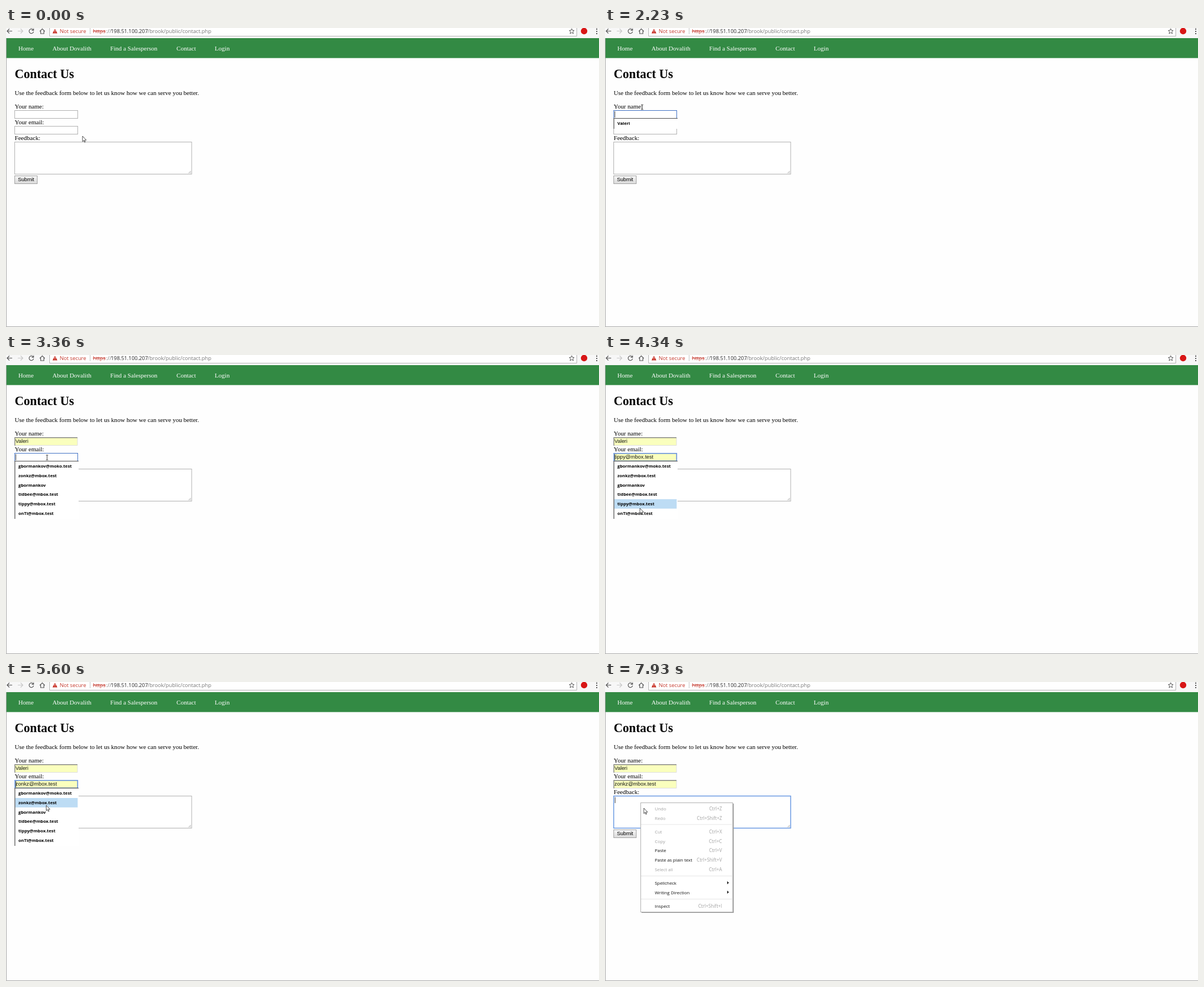
Animation of 1054 by 531 pixels, one loop 8 s. Source, as an HTML page:

```html
<!DOCTYPE html>
<html lang="en">
<head>
<meta charset="utf-8">
<title>Contact form</title>
<style>
  html, body { margin: 0; width: 100%; height: 100%; overflow: hidden; background: #fefefe; }
  svg { display: block; }
  text { white-space: pre; }
  .serif { font: 11.1px "Liberation Serif", serif; }
  .title { font: bold 22.2px "Liberation Serif", serif; }
  .sans { font: 9.25px "Liberation Sans", sans-serif; }
  .bar { font: 9.3px "Open Sans", sans-serif; }
  .item { font: bold 7.75px "Open Sans", sans-serif; }
  .menu { font: 7.9px "Open Sans", sans-serif; }
  .keys { font: 8.2px "Open Sans", sans-serif; text-anchor: end; }
</style>
</head>
<body>
<svg width="1054" height="531" viewBox="0 0 1054 531">
  <rect width="1054" height="531" fill="#fefefe"/>

  <!-- Browser toolbar -->
  <rect width="1054" height="18" fill="#f7f7f7"/>
  <path d="M77.5 -1V14.5H1014.5V-1" fill="#fff" stroke="#b4b4b4"/>
  <g fill="none" stroke="#555" stroke-width="1.2">
    <path d="M11 5.5H2M6 1.5L2 5.5L6 9.5"/>
    <path d="M21 5.5H30M26 1.5L30 5.5L26 9.5" stroke="#c8c8c8"/>
    <path d="M48.3 3.2A4 4 0 1 0 49 6.5M49 1V4.2H45.6"/>
    <path d="M60 6L64.5 1.5L69 6M61.6 5V10H67.4V5"/>
    <path d="M1005.5 1L1006.8 4.2L1010 4.4L1007.5 6.6L1008.4 10L1005.5 8.2L1002.6 10L1003.5 6.6L1001 4.4L1004.2 4.2Z" stroke-width="1"/>
  </g>
  <path d="M87 1.5L91.3 9.5H82.7Z" fill="#c5281c"/>
  <path d="M87 4V6.7M87 7.5V8.5" stroke="#fff"/>
  <path d="M149.5 0V11" stroke="#c4c4c4"/>
  <g class="bar">
    <text x="95.5" y="9" fill="#c5392c">Not secure</text>
    <text x="154.5" y="9" fill="#c5392c" text-decoration="line-through">https</text>
    <text x="178" y="9" fill="#777">://</text>
    <text x="186.3" y="9" fill="#222">198.51.100.207</text>
    <text x="251.5" y="9" fill="#777">/brook/public/contact.php</text>
  </g>
  <circle cx="1027.5" cy="5.5" r="5.7" fill="#d81616"/>
  <path d="M1050 1V3M1050 5V7M1050 9V11" stroke="#555" stroke-width="2"/>

  <!-- Page -->
  <rect y="18" width="1054" height="35.4" fill="#338a44"/>
  <path d="M.5 18V530.5H1054" fill="none" stroke="#a6a6a6"/>
  <g class="serif" fill="#fff">
    <text x="22" y="40">Home</text>
    <text x="82.5" y="40">About Dovalith</text>
    <text x="185.3" y="40">Find a Salesperson</text>
    <text x="303" y="40">Contact</text>
    <text x="371" y="40">Login</text>
  </g>
  <text class="title" x="15.5" y="88.5">Contact Us</text>
  <g class="serif">
    <text x="15.5" y="119">Use the feedback form below to let us know how we can serve you better.</text>
    <text x="15.5" y="143">Your name:</text>
    <text x="15.5" y="171.3">Your email:</text>
    <text x="15.5" y="199.3">Feedback:</text>
  </g>
  <linearGradient id="face" x2="0" y2="1">
    <stop stop-color="#f7f7f7"/><stop offset="1" stop-color="#dadada"/>
  </linearGradient>
  <rect x="15.5" y="262.5" width="40" height="14" fill="url(#face)" stroke="#a2a2a2"/>
  <text class="sans" x="21.3" y="272.2">Submit</text>
  <g id="scene"></g>
</svg>
<script>
const LOOP = 8000, ROW = 16.7, LIST_TOP = 189.3;
const NAMES = ['Valeri'];
const EMAILS = ['gbormankov@moko.test', 'zonkz@mbox.test', 'gbormankov',
                'tidbee@mbox.test', 'tippy@mbox.test', 'onTi@mbox.test'];

// Pointer steps: start time, shape (A arrow, I text beam), x, y
const POINTER = [
  [0, 'A', 136, 192], [310, 'A', 122, 183], [440, 'A', 100, 168], [580, 'I', 82, 157], [710, 'I', 72, 153.5],
  [1980, 'I', 69, 147], [2230, 'I', 66, 140.5], [2380, 'I', 66, 147], [2520, 'I', 67, 155],
  [2660, 'A', 68, 162], [2800, 'A', 69, 165], [3220, 'I', 72, 177], [3360, 'I', 73, 182],
  [3630, 'A', 73, 197], [3770, 'A', 70, 222], [3920, 'A', 66, 246], [4060, 'A', 60, 272],
  [4340, 'A', 62, 272], [5030, 'A', 62, 268], [5170, 'A', 63, 258], [5310, 'A', 65, 246],
  [5450, 'A', 68, 232], [5600, 'A', 71.5, 219], [5730, 'A', 74, 213], [5870, 'A', 76, 210],
  [6000, 'A', 78, 209], [6150, 'A', 77, 212], [6300, 'A', 74, 215], [6580, 'I', 73, 214],
  [6860, 'I', 74, 215], [7540, 'A', 63, 214], [7735, 'A', 66, 219], [7930, 'A', 69, 224]
];
// The caret switches on and off alternately at these times
const BLINKS = [990, 1550, 1980, 2660, 3360, 3920, 4340, 4750, 5310, 5730, 6150];
const CHANGES = [...new Set([...POINTER.map(p => p[0]), ...BLINKS, 990, 3080, 6580, 7140])].sort((a, b) => a - b);

const MENU = [
  [228, 'Undo', 'Ctrl+Z'], [244.5, 'Redo', 'Ctrl+Shift+Z'],
  [269, 'Cut', 'Ctrl+X'], [285.7, 'Copy', 'Ctrl+C'], [302.2, 'Paste', 'Ctrl+V', 1],
  [319, 'Paste as plain text', 'Ctrl+Shift+V', 1], [335.7, 'Select all', 'Ctrl+A'],
  [360, 'Spellcheck', '', 1], [376.7, 'Writing Direction', '', 1], [401, 'Inspect', 'Ctrl+Shift+I', 1]
];

const rect = (x, y, w, h, fill, stroke = 'none', weight = 1) =>
  `<rect x="${x}" y="${y}" width="${w}" height="${h}" fill="${fill}" stroke="${stroke}" stroke-width="${weight}"/>`;
const line = (d, color, weight = 1) =>
  `<path d="${d}" fill="none" stroke="${color}" stroke-width="${weight}"/>`;
const text = (kind, x, y, value, fill = '#000') =>
  `<text class="${kind}" x="${x}" y="${y}" fill="${fill}">${value}</text>`;

function field(y, value, focused) {
  let box;
  if (!value) box = rect(15.5, y + .5, 112, 14, '#fff', focused ? '#3f70c4' : '#b0b0b0');
  else if (focused) box = rect(15.8, y + .8, 111.5, 13.5, '#faffbd', '#6c94dc', 1.7);
  else box = rect(15, y, 112, 15, '#faffbd')
    + line(`M127 ${y + 1}V${y + 14.5}H16`, '#dedede')
    + line(`M15.7 ${y + 15}V${y + .7}H127`, '#868686', 1.4);
  return box + text('sans', 16.8, y + 10.4, value, '#111');
}

function dropdown(top, bottom, items, hover) {
  const rows = items.map((item, i) => {
    const y = top + i * ROW;
    return (i === hover ? rect(16.4, y, 111, ROW, '#bddcf4') : '') + text('item', 22, y + 11, item);
  });
  return rect(15, top - .8, 114, bottom - top + .8, '#fff') + rows.join('')
    + line(`M15.8 ${bottom}V${top - .8}H129`, '#4a4a4a', 1.2);
}

function contextMenu() {
  const rows = MENU.map(([y, label, keys, enabled]) =>
    text('menu', 88.5, y, label, enabled ? '#111' : '#a2a2a2') + text('keys', 208, y, keys, '#a2a2a2'));
  const arrows = [356.5, 373.2].map(y => `<path d="M217 ${y - 2.8}L220.5 ${y}L217 ${y + 2.8}Z" fill="#333"/>`);
  const rules = [253, 344.5, 385.5].map(y => line(`M64 ${y}H226.5`, '#e6e6e6'));
  return rect(65, 216, 163.8, 194, '#999') + rect(63.5, 214.5, 163.5, 194, '#fff', '#b0b0b0')
    + rows.join('') + arrows.join('') + rules.join('');
}

function pointer(shape, x, y) {
  const art = shape === 'A'
    ? '<path d="M0 0V9.6L2.2 7.6L3.7 11L5 10.4L3.6 7.1H6.7Z" fill="#fff" stroke="#222" stroke-width=".8"/>'
    : line('M-2 -4.3H-.5L0 -3.8L.5 -4.3H2M0 -3.8V3.8M-2 4.3H-.5L0 3.8L.5 4.3H2', '#222', .9);
  return `<g transform="translate(${x} ${y})">${art}</g>`;
}

function draw(t) {
  const [, shape, px, py] = POINTER.filter(p => p[0] <= t).pop();
  const between = (a, b) => t >= a && t < b;
  const nameList = between(990, 3080), emailList = between(3360, 6580);
  const onName = between(990, 3360), onEmail = between(3360, 7140), onFeedback = t >= 7140;

  const hoverName = nameList && shape === 'A' ? 0 : -1;
  const hoverEmail = emailList && shape === 'A' ? Math.floor((py - LIST_TOP) / ROW) : -1;
  const name = t >= 3080 || hoverName === 0 ? NAMES[0] : '';
  const email = t >= 6580 ? EMAILS[1] : EMAILS[hoverEmail] || '';
  const blink = BLINKS.filter(b => b <= t).length % 2 === 1;

  let out = field(146, name, onName) + field(174, email, onEmail)
    + rect(15.5, 202.5, 314.5, 57, '#fff', onFeedback ? '#5f92e0' : '#b0b0b0', onFeedback ? 1.4 : 1)
    + line('M324.5 258L328.5 254M327 258L328.5 256.5', '#888', .8);

  if (nameList && blink) out += line('M17.5 148V159', '#222', .9);
  if (emailList && blink) out += line('M17.5 176V187', '#222', .9);
  if (between(6580, 7140)) {
    out += line('M93.4 176V187', '#222', .9)
      + line('M17 187' + 'l1.5 -1.4l1.5 1.4'.repeat(8), '#e03030', .8);
  }
  if (onFeedback) out += line('M18 204.5V215', '#222', .9);
  if (nameList) out += dropdown(161.3, 179, NAMES, hoverName);
  if (emailList) out += dropdown(LIST_TOP, 291, EMAILS, hoverEmail);
  if (t >= 7540) out += contextMenu();
  return out + pointer(shape, px, py);
}

const scene = document.getElementById('scene');
const start = performance.now();
let shown = -1;
function tick() {
  const t = (performance.now() - start) % LOOP;
  const step = CHANGES.filter(c => c <= t).pop();
  if (step !== shown) {
    shown = step;
    scene.innerHTML = draw(step);
  }
  requestAnimationFrame(tick);
}
tick();
</script>
</body>
</html>
```
